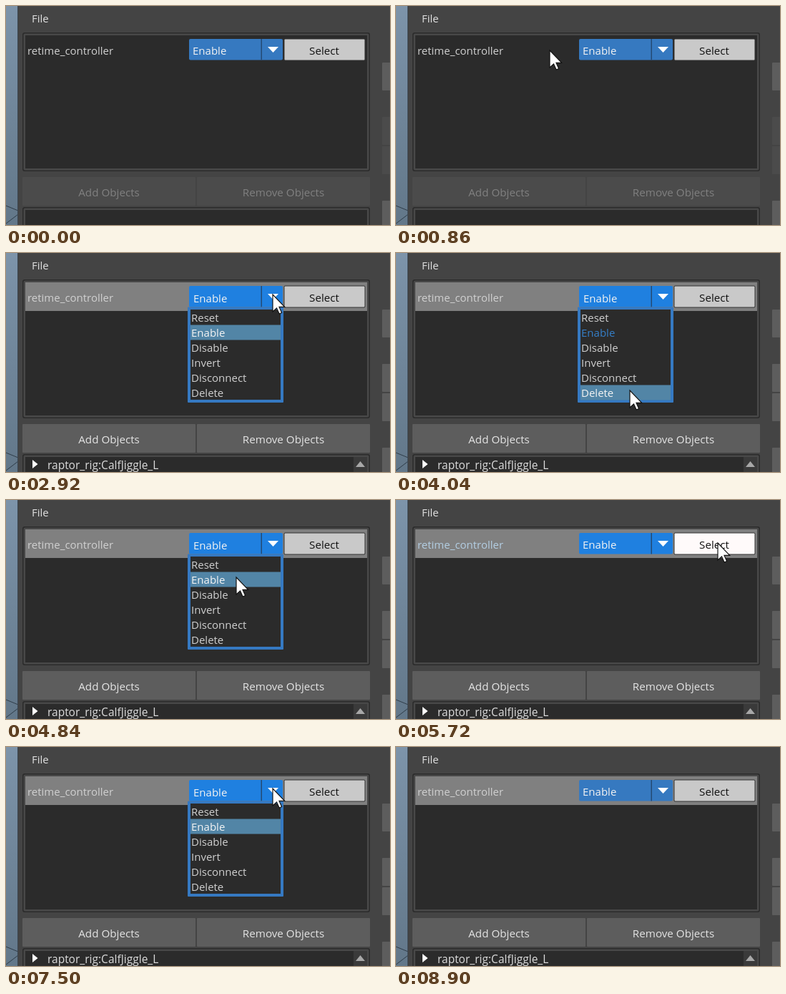
An HTML page with a canvas for the animation above (8980 ms loop, 537x306 px).

```html
<!DOCTYPE html>
<html lang="en">
<head>
<meta charset="utf-8">
<title>Controller panel</title>
<style>
html, body { margin: 0; width: 100%; height: 100%; overflow: hidden; background: #444; }
canvas { display: block; }
</style>
</head>
<body>
<canvas id="stage" width="537" height="306"></canvas>
<script>
const ctx = document.getElementById('stage').getContext('2d');
const LOOP = 8980;
const STEP = 73.6;
const ITEMS = ['Reset', 'Enable', 'Disable', 'Invert', 'Disconnect', 'Delete'];

// Pointer stops: time, x, y
const PATH = [
  [220, 545, 150], [720, 215, 62], [1150, 215, 62], [1500, 351, 53], [1680, 351, 53],
  [1980, 373, 58], [3050, 373, 58], [3300, 330, 92], [3900, 327, 192], [4250, 327, 192],
  [4700, 322, 108], [4950, 322, 108], [5420, 450, 60], [6150, 450, 60],
  [6650, 373, 58], [7950, 373, 58], [8450, 545, 130]
];
const between = (t, a, b) => t >= a && t < b;

function pointerAt(t) {
  const i = PATH.findIndex(stop => stop[0] > t);
  if (i < 1) return null;
  const [t0, x0, y0] = PATH[i - 1], [t1, x1, y1] = PATH[i];
  const k = (t - t0) / (t1 - t0), e = k * k * (3 - 2 * k);
  return { x: x0 + (x1 - x0) * e, y: y0 + (y1 - y0) * e };
}

function box(x, y, w, h, color, radius = 0) {
  ctx.fillStyle = color;
  ctx.beginPath();
  ctx.roundRect(x, y, w, h, radius);
  ctx.fill();
}

function shape(color, ...points) {
  ctx.fillStyle = color;
  ctx.beginPath();
  points.forEach(([x, y]) => ctx.lineTo(x, y));
  ctx.closePath();
  ctx.fill();
}

function text(label, x, y, color, size = 15, align = 'left') {
  ctx.font = `${size}px "Open Sans", "Noto Sans", sans-serif`;
  ctx.textAlign = align;
  ctx.fillStyle = color;
  ctx.fillText(label, x, y);
}

function frame(y, h, edge) {
  box(23, y, 486, h, edge, 3);
  box(24.5, y + 1.5, 483, h - 3, '#484848', 2);
  box(27, y + 4, 478, h - 8, '#2b2b2b');
}

function viewport() {
  const sky = ctx.createLinearGradient(0, 0, 0, 306);
  sky.addColorStop(0, '#7d94aa');
  sky.addColorStop(1, '#627789');
  box(0, 0, 17, 306, sky);
  ctx.strokeStyle = 'rgba(30,40,50,.75)';
  ctx.lineWidth = 1;
  ctx.beginPath();
  ctx.moveTo(0, 279); ctx.lineTo(17, 286);
  ctx.moveTo(0, 304); ctx.lineTo(17, 291);
  ctx.stroke();
  box(16, 0, 1, 306, '#3c4650');
}

function button(x, y, w, h, label, enabled) {
  box(x, y, w, h, enabled ? '#5d5d5d' : '#4b4b4b', 1);
  text(label, x + w / 2, y + 27, enabled ? '#e4e4e4' : '#808080', 15.2, 'center');
}

function combo(open, bright, hovered) {
  box(256, 46, 131, 29.5, bright ? '#1f80e0' : '#3679c0', 2);
  box(356.5, 46, 1.5, 29.5, hovered && !open ? '#2b6fae' : '#244a73');
  const shift = open ? 1 : 0;
  text('Enable', 261 + shift, 68 + shift, '#f2f2f2');
  shape('#fff', [366, 57], [381, 57], [373.5, 65]);
}

function popup(current) {
  box(254, 75.5, 134, 133.5, '#3579c2', 1);
  box(258, 79, 126, 126, '#2b2b2b');
  ITEMS.forEach((label, i) => {
    const y = 79.5 + i * 21;
    if (i === current) box(258, y, 126, 21, '#5285a6');
    text(label, 259, y + 16.5, i === current ? '#f4f4f4' : i === 1 ? '#357fc8' : '#d0d0d0');
  });
}

function arrow({ x, y }) {
  ctx.save();
  ctx.translate(x, y);
  ctx.scale(1.45, 1.45);
  shape('#fff', [0, 0], [0, 16.5], [3.8, 13], [6.3, 18.6], [8.7, 17.6], [6.2, 12], [11.5, 12]);
  ctx.strokeStyle = '#111';
  ctx.lineWidth = 0.8;
  ctx.stroke();
  ctx.restore();
}

function draw(t) {
  const pointer = pointerAt(t);
  const selected = t >= 880;
  const open = between(t, 2280, 4850) || between(t, 6850, 8000);
  const focused = selected && t < 2280;
  const over = (x0, x1) => pointer && between(pointer.x, x0, x1) && between(pointer.y, 46, 76);
  const onCombo = over(256, 388), onSelect = over(389, 503);

  box(0, 0, 537, 306, '#444');
  viewport();
  text('File', 36, 23, '#e0e0e0');

  frame(37, 194, focused ? '#4b7d9f' : '#2b2b2b');
  if (selected) box(27, 41, 478, 40, '#808080');
  if (focused) {
    ctx.strokeStyle = '#222';
    ctx.lineWidth = 1;
    ctx.setLineDash([1, 1]);
    ctx.strokeRect(27.5, 41.5, 477, 39);
    ctx.setLineDash([]);
  }
  const active = selected && !open && t < 8200;
  text('retime_controller', 30, 68, active ? '#b3cee3' : '#d0d0d0');
  combo(open, onCombo || between(t, 2280, 8200), onCombo);
  box(388.5, 45.5, 114, 31, '#333', 2);
  box(389.5, 46.5, 112, 29, onSelect && !open ? '#fffafa' : '#c9c9c9', 1);
  text('Select', 445, 68, '#111', 15.2, 'center');

  button(23, 239, 242, 40, 'Add Objects', selected);
  button(267, 239, 242, 40, 'Remove Objects', selected);

  frame(281, 60, '#2b2b2b');
  if (selected) {
    shape('#fff', [37, 289], [44.5, 295], [37, 301]);
    text('raptor_rig:CalfJiggle_L', 58, 302, '#dcdcdc', 15.5);
    box(486, 285, 19, 21, '#3a3a3a');
    shape('#a8a8a8', [489, 299], [502, 299], [495.5, 291]);
  }

  [79, 155, 196, 272].forEach((y, i) => {
    const enabled = selected || i === 0 || i === 3;
    box(526, y, 14, 39, enabled ? '#5d5d5d' : '#4b4b4b', 1);
  });

  if (open) {
    const row = pointer ? Math.floor((pointer.y - 79.5) / 21) : -1;
    popup(row < 0 ? 1 : Math.min(row, 5));
  }
  if (pointer) arrow(pointer);
}

function tick(now) {
  draw(Math.floor((now % LOOP) / STEP) * STEP);
  requestAnimationFrame(tick);
}
requestAnimationFrame(tick);
</script>
</body>
</html>
```
